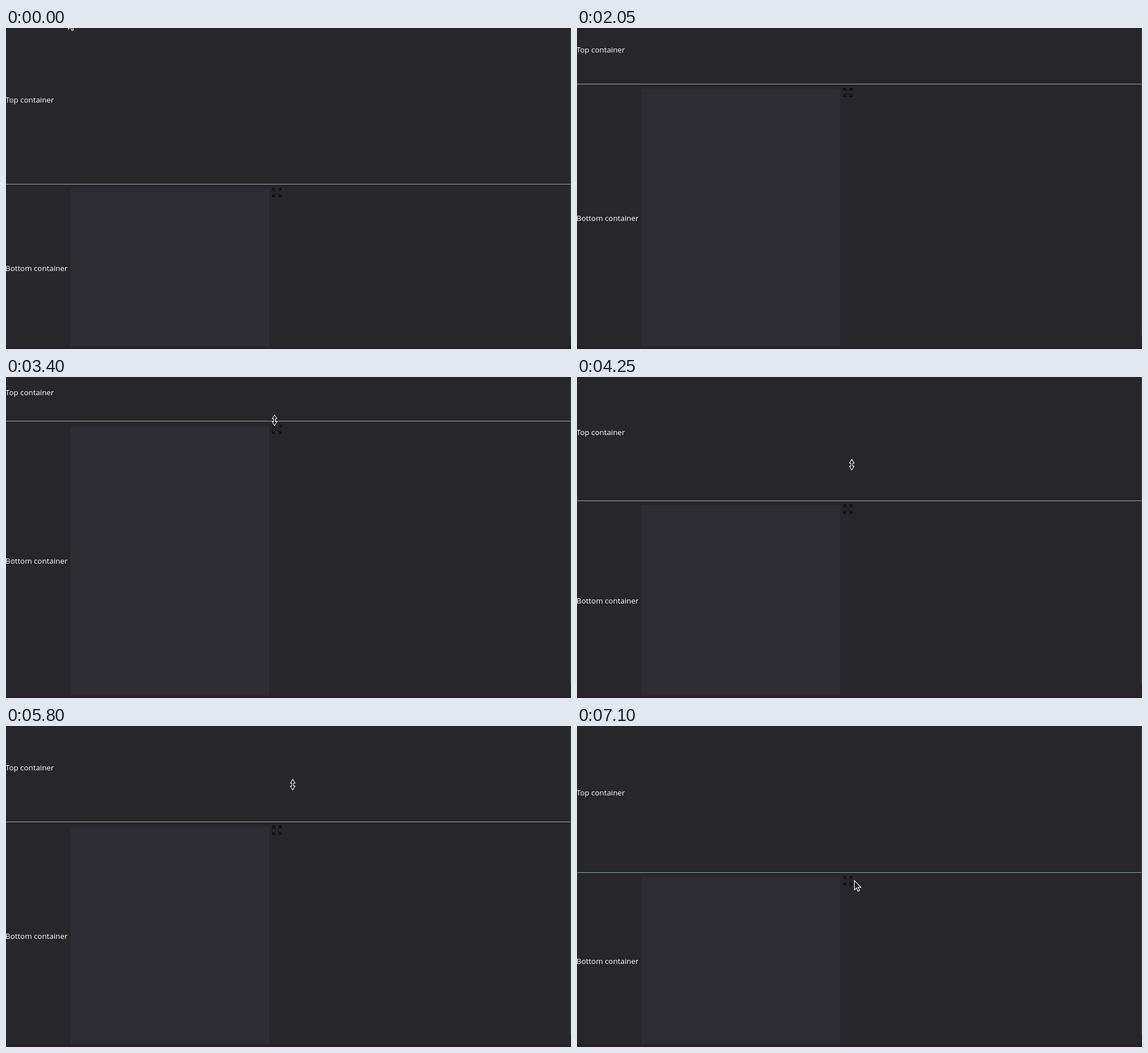
These frames come from a looping animation (993x564 px, 7.15 s). An HTML page:

```html
<!DOCTYPE html>
<html lang="en">
<head>
<meta charset="utf-8">
<title>Split container</title>
<style>
  html, body { margin: 0; width: 100%; height: 100%; overflow: hidden; background: #27262a; }
  svg { display: block; width: 993px; height: 564px; }
  text { font: 13.33px "Open Sans", "Noto Sans", sans-serif; fill: #fff; }
</style>
</head>
<body>
<svg viewBox="0 0 993 564">
  <rect width="993" height="564" fill="#27262a"/>
  <g id="panel">
    <rect x="112" y="-1" width="352" height="600" fill="#242327"/>
    <rect x="113" width="350" height="600" fill="#2d2b34"/>
  </g>
  <rect y="560" width="993" height="4" fill="#2a1f29"/>
  <rect x="992" width="1" height="540" fill="#47484b"/>
  <rect x="992" y="540" width="1" height="24" fill="#0d2c31"/>
  <rect id="line" width="992" height="1"/>
  <text id="top" x="-1">Top container</text>
  <text id="bottom" x="-1">Bottom container</text>
  <g id="icon" fill="none" stroke="#0b0b0d" stroke-width="1.2"></g>
  <path id="arrow" d="M.5 .5V17L4.3 13.5L7 19.5L9.7 18.3L7 12.4H12Z"
    fill="#222125" stroke="#fff" stroke-width="1.1"/>
  <path id="resize" d="M0-9.5L4-2.5H1.5V2.5H4L0 9.5L-4 2.5H-1.5V-2.5H-4Z"
    fill="#161618" stroke="#fff" stroke-width="1.1"/>
</svg>
<script>
const LOOP = 7150, STEP = 50;
const GRAB = 850, RELEASE = 6480;
const el = id => document.getElementById(id);
const [panel, line, topText, bottomText, icon, arrow, resize] =
  ["panel", "line", "top", "bottom", "icon", "arrow", "resize"].map(el);

// The divider swings between two heights, each of which may drift
const swings = [
  { start: 1000, end: 2400, turns: 2, from: [274.2, 274.2], to: [102.3, 96.9] },
  { start: 3000, end: 3400, turns: 0.5, from: [274.2, 274.2], to: [77.7, 77.7] },
  { start: 4100, end: 4805, turns: 1.5, from: [77.7, 77.7], to: [274.2, 274.2] },
  { start: 4900, end: 6483, turns: 3, from: [274.2, 257.7], to: [113, 113] }
];

// The pointer follows the divider and glides relative to it: [start, end, dx, dy]
const glides = [
  [0, 550, 409, 307], [550, 750, -40, -15],
  [1000, 1250, 0, -123], [2400, 2800, 0, 123],
  [3000, 3400, -6, -5], [3750, 3900, 0, -97], [4000, 4200, 11, 36],
  [4900, 5800, 21, -2], [RELEASE, 6750, -17, 84], [6850, 7100, 0, -6]
];

const mix = (a, b, u) => a + (b - a) * u;
const progress = (t, a, b) => Math.min(1, Math.max(0, (t - a) / (b - a)));
const wave = u => (1 - Math.cos(2 * Math.PI * u)) / 2;
const ease = (t, a, b) => wave(progress(t, a, b) / 2);

function dividerAt(t) {
  const s = swings.findLast(s => t >= s.start) || swings[0];
  const u = progress(t, s.start, s.end);
  return mix(mix(...s.from, u), mix(...s.to, u), wave(s.turns * u));
}

function pointerAt(t, y) {
  const p = { x: 109, y: y - 289 };
  for (const [a, b, dx, dy] of glides) {
    const k = ease(t, a, b);
    p.x += dx * k;
    p.y += dy * k;
  }
  return p;
}

const move = (node, x, y) =>
  node.setAttribute("transform", `translate(${Math.round(x)} ${Math.round(y)})`);
const show = (node, on) => node.setAttribute("visibility", on ? "visible" : "hidden");

for (const sx of [-1, 1]) for (const sy of [-1, 1]) {
  const p = document.createElementNS("http://www.w3.org/2000/svg", "path");
  p.setAttribute("d", "M2 2L7 7M2.8 7.4H7.4V2.8");
  p.setAttribute("transform", `scale(${sx} ${sy})`);
  icon.append(p);
}

function draw(t) {
  const y = dividerAt(t), pos = pointerAt(t, y);
  const textY = Math.round(y / 2 - 11.4) + 5;
  const resizing = t >= GRAB && t < RELEASE;
  line.setAttribute("y", Math.floor(y));
  line.setAttribute("fill", resizing ? "#a5a5a7" : "#93a5a2");
  topText.setAttribute("y", textY);
  bottomText.setAttribute("y", textY + 296);
  move(panel, 0, y + 8);
  move(icon, 476, y + 14.5);
  move(arrow, pos.x, pos.y);
  move(resize, pos.x, pos.y);
  show(arrow, !resizing);
  show(resize, resizing);
}

const start = performance.now();
function tick() {
  const t = (performance.now() - start) % LOOP;
  draw(Math.floor(t / STEP) * STEP);
  requestAnimationFrame(tick);
}
tick();
</script>
</body>
</html>
```
